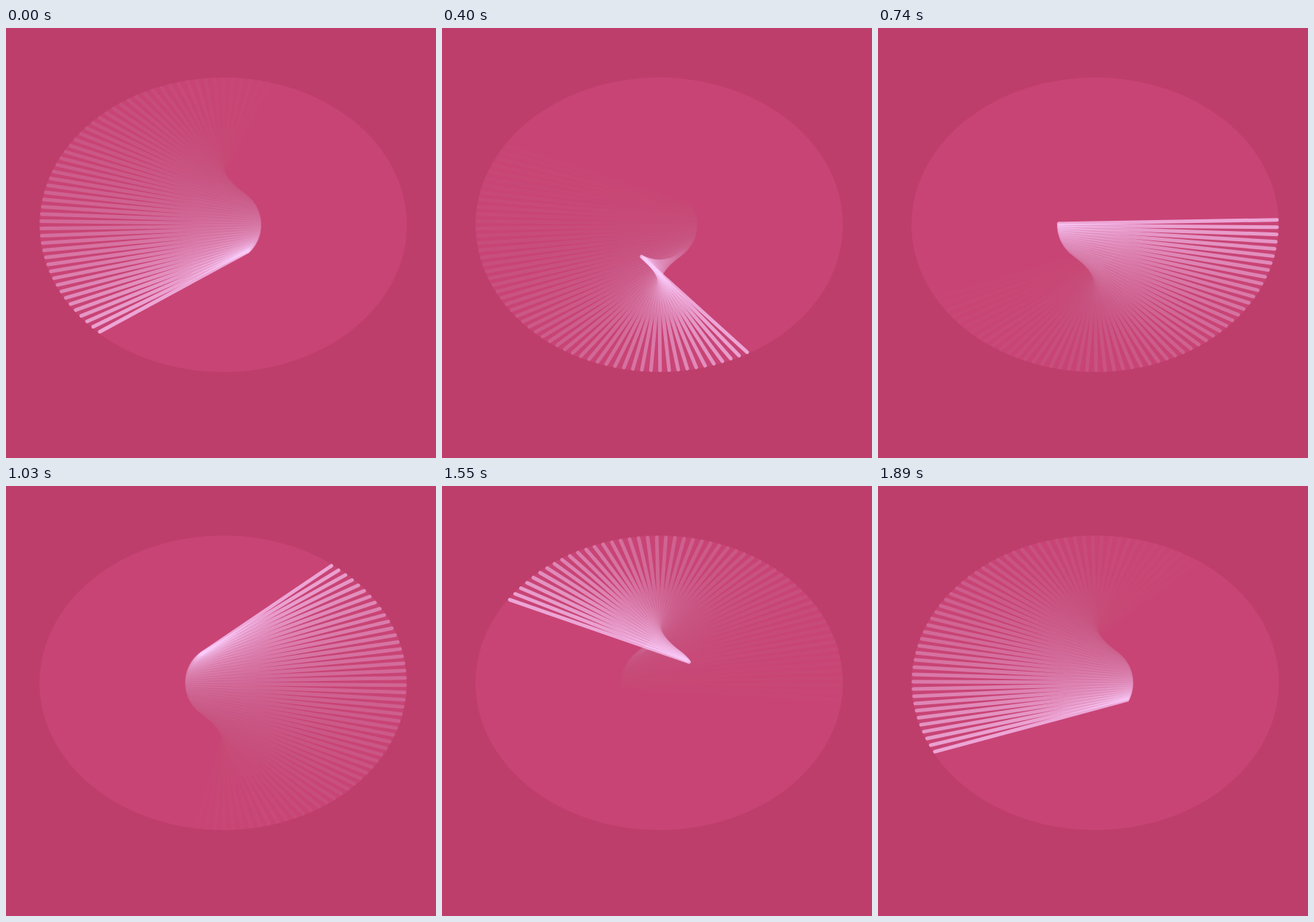
These frames come from a looping animation (591 px wide and 591 px high, 1.99 s). An HTML page:

```html
<!DOCTYPE html>
<html lang="en">
<head>
<meta charset="utf-8">
<title>Turning fan</title>
<style>
  html, body { margin: 0; width: 100%; height: 100%; overflow: hidden; background: #bd3e6a; }
  svg { display: block; width: 100vw; height: 100vh; }
</style>
</head>
<body>
<svg id="stage" viewBox="0 0 591 591">
  <rect width="591" height="591" fill="#bd3e6a"/>
  <ellipse cx="298.5" cy="270.5" rx="252.5" ry="202.5" fill="#c84475"/>
  <g id="fan" stroke-width="5" stroke-linecap="round" stroke-opacity="0.7"/>
</svg>
<script>
const LOOP = 1990;
const CENTER = { x: 298.5, y: 270.5 };
const START_ANGLE = 2.316;
const ANGLE_STEP = 0.05;
const STEPS_PER_POSE = 3.6;
const TRAIL = 54;
const FADE = 0.95;

const BACK = [189, 62, 106];
const RESIDUE = [200, 68, 117];
const GLOW = [252, 208, 255];

// Poses last 60 ms, apart from some shorter ones and the long last one.
const POSES = 34;
const SHORT_POSES = new Set([0, 4, 8, 10, 16, 21, 24, 28, 31]);
const poseStarts = [];
for (let i = 0, t = 0; i < POSES; i++) {
  poseStarts.push(t);
  t += SHORT_POSES.has(i) ? 50 : 60;
}

function trailColor(age) {
  const strength = FADE ** age;
  const channels = BACK.map((base, i) =>
    Math.round(Math.max(RESIDUE[i], base + (GLOW[i] - base) * strength)));
  return `rgb(${channels})`;
}

// Oldest line first, so newer ones paint over it.
const fan = document.getElementById("fan");
const lines = Array.from({ length: TRAIL }, (_, i) => {
  const age = TRAIL - 1 - i;
  const node = document.createElementNS("http://www.w3.org/2000/svg", "line");
  node.setAttribute("stroke", trailColor(age));
  fan.append(node);
  return { node, age };
});

function place(node, angle) {
  const c = Math.cos(angle), s = Math.sin(angle);
  node.setAttribute("x1", CENTER.x + 250 * c);
  node.setAttribute("y1", CENTER.y + 200 * s);
  node.setAttribute("x2", CENTER.x - 50 * c);
  node.setAttribute("y2", CENTER.y + 50 * s);
}

function render(time) {
  const pose = poseStarts.findLastIndex(start => start <= time);
  const head = Math.floor(pose * STEPS_PER_POSE + 0.4);
  for (const { node, age } of lines) {
    place(node, START_ANGLE - ANGLE_STEP * (head - age));
  }
}

const began = performance.now();
function tick() {
  render((performance.now() - began) % LOOP);
  requestAnimationFrame(tick);
}
tick();
</script>
</body>
</html>
```
